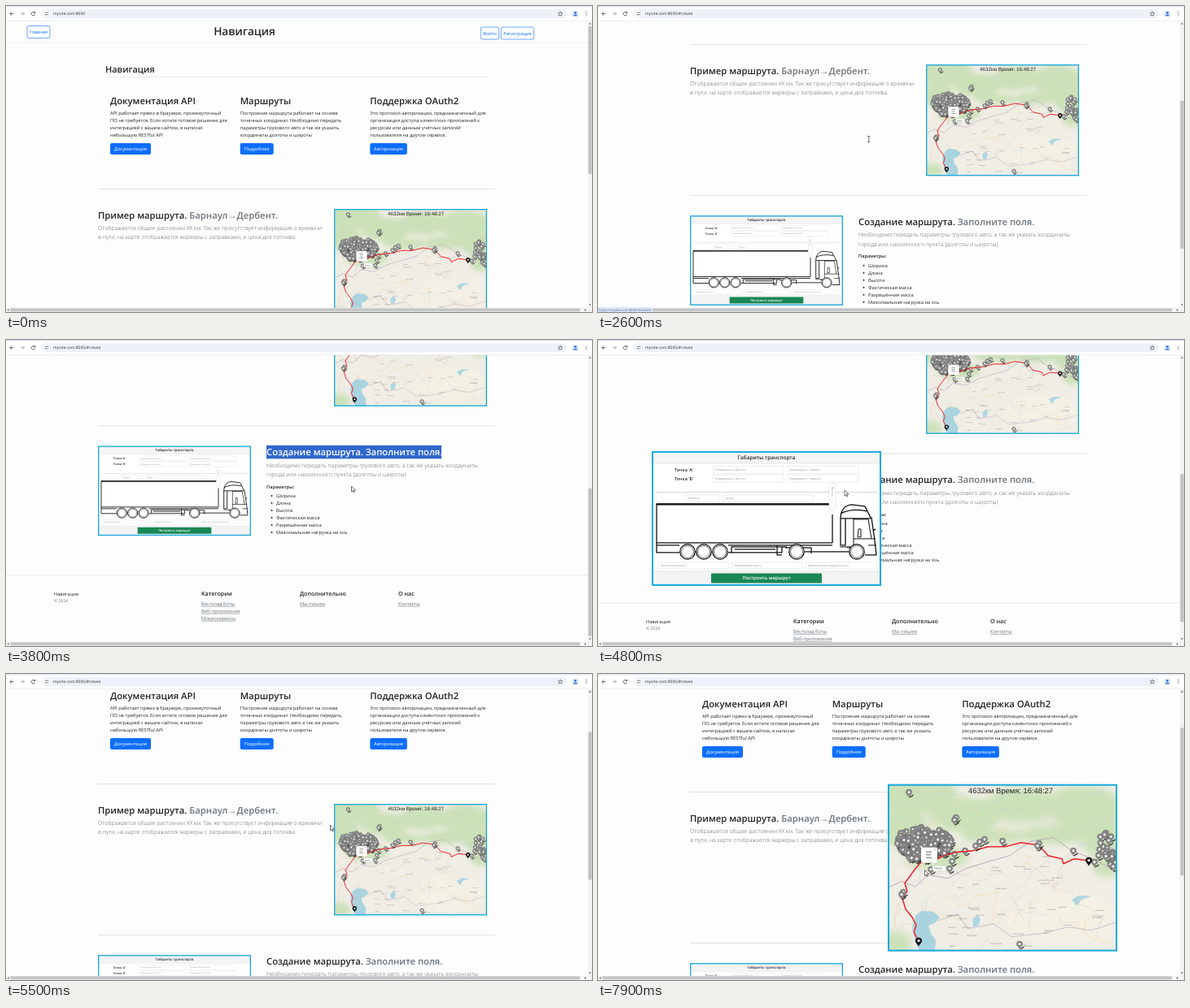
Recreate the animation shown at these times as an HTML page. Size 720 by 377 pixels, loop 8 s.

```html
<!DOCTYPE html>
<html lang="ru">
<head>
<meta charset="utf-8">
<title>Навигация</title>
<style>
html, body { margin: 0; width: 100%; height: 100%; overflow: hidden; background: #fdfdfd; }
svg { display: block; width: 100%; height: 100%; }
text { font-family: "Open Sans", "Noto Sans", sans-serif; text-rendering: geometricPrecision; white-space: pre; }
</style>
</head>
<body>
<svg id="stage" viewBox="0 0 720 377" xmlns="http://www.w3.org/2000/svg"></svg>
<script>
const INK = '#212529', MUTED = '#6c757d', BLUE = '#0d6efd', CYAN = '#18a9dd';

// y is the middle of the capitals
const text = (x, y, str, size = 5.75, extra = '') =>
  `<text x="${x}" y="${(y + size * .35).toFixed(2)}" font-size="${size}" fill="${INK}" ${extra}>${str}</text>`;
const color = c => `style="fill:${c}"`;
const semi = 'font-weight="600"';
const mid = 'text-anchor="middle"';
const lines = (x, y, step, list, size, extra) =>
  list.map((s, i) => text(x, y + i * step, s, size, extra)).join('');
const rect = (x, y, w, h, fill, extra = '') =>
  `<rect x="${x}" y="${y}" width="${w}" height="${h}" fill="${fill}" ${extra}/>`;
const rule = (x1, x2, y, c = '#d4d6d8') => rect(x1, y - .3, x2 - x1, .7, c);
const path = (d, stroke, width, extra = '') =>
  `<path d="${d}" fill="none" stroke="${stroke}" stroke-width="${width}" ${extra}/>`;
const circle = (x, y, r, fill, extra = '') => `<circle cx="${x}" cy="${y}" r="${r}" fill="${fill}" ${extra}/>`;

const button = (x, w, label, id = '') =>
  rect(x, 169, w, 14, BLUE, `rx="2" ${id}`) + text(x + w / 2, 176.2, label, 5.65, mid + color('#fff'));
const outlineButton = (x, y, w, label) =>
  rect(x, y, w, 15, '#fff', `rx="2" stroke="${BLUE}" stroke-width=".6"`) +
  text(x + w / 2, y + 7.6, label, 5.6, mid + color(BLUE));

function column(x, title, body, width, label, id) {
  return text(x, 117, title, 11.3, semi) + lines(x, 131.5, 9, body) + button(x, width, label, id);
}

function rng(seed) {
  return () => (seed = (seed * 16807) % 2147483647) / 2147483647;
}

// Route map, 282 x 206
function mapPicture() {
  const rand = rng(77);
  const span = (a, b) => a + rand() * (b - a);
  const many = (n, fn) => Array.from({ length: n }, fn).join('');
  const pin = ([x, y]) => `<use href="#pin" x="${x.toFixed(1)}" y="${y.toFixed(1)}"/>`;
  const blob = (x, y, rx, ry, fill) => `<ellipse cx="${x}" cy="${y}" rx="${rx}" ry="${ry}" fill="${fill}"/>`;

  const greens = [[30, 12, 55, 26], [95, 38, 45, 22], [20, 55, 30, 24], [165, 26, 45, 22], [240, 28, 48, 26],
    [262, 62, 26, 28], [205, 62, 40, 12], [132, 64, 42, 9], [60, 90, 40, 14], [270, 100, 18, 15], [8, 196, 22, 14]]
    .map(g => blob(...g, '#c5dfb0')).join('');
  const wander = (n, c, w) => many(n, () => {
    let x = span(0, 270), y = span(8, 200), d = `M${x | 0} ${y | 0}`;
    const dx = span(-10, 10), dy = span(-7, 7);
    for (let i = 0; i < 6; i++) d += `l${(dx + span(-5, 5)).toFixed(1)} ${(dy + span(-5, 5)).toFixed(1)}`;
    return path(d, c, w);
  });
  const towns = ['Уральск', 'Актобе', 'Костанай', 'Астана', 'Караганда', 'Атырау', 'Кокшетау', 'Аральск',
    'Ташкент', 'Бишкек', 'Павлодар', 'Балхаш', 'Жезказган', 'Тараз', 'Орск', 'Рудный'];
  const labels = many(40, (_, i) => text(span(70, 255).toFixed(1), span(88, 200), towns[i % 16], 2.7, color('#8a8a8a')));
  const cluster = Array.from({ length: 135 }, () => {
    const a = span(0, 6.283), r = Math.sqrt(rand());
    return [44 + 37 * r * Math.cos(a), 76 + 20 * r * Math.sin(a) + 3];
  });
  const east = Array.from({ length: 20 }, () => [span(258, 277), span(64, 108)]);
  const single = [[26, 16], [84, 47], [82, 50], [113, 77], [119, 74], [141, 76], [186, 79], [184, 82], [17, 142],
    [19, 139], [162, 203], [82, 92], [95, 88], [76, 110], [79, 101], [53, 111], [108, 82], [254, 102], [228, 88]];
  const pins = [...cluster, ...east, ...single].sort((a, b) => a[1] - b[1]).map(pin).join('');
  const route = 'M38 194L32 182 35 174 30 164 22 154 18 141 24 132 21 122 34 104 41 96 54 96 69 88 84 84 104 82 ' +
    '124 77 144 77 164 72 184 75 191 81 197 88 214 92 216 98 229 92 247 94';
  const target = (x, y) =>
    `<path d="M${x} ${y}c-1-3-4-4.500-4-7a4 4 0 0 1 8 0c0 2.500-3 4-4 7z" fill="#111"/>` + circle(x, y - 7, 1.6, '#fff');

  return `<g clip-path="url(#mapClip)">` + rect(0, 0, 282, 206, '#f0ede5') +
    `<g filter="url(#soft)" opacity=".85">${greens}${blob(215, 165, 70, 34, '#f4f0e4')}</g>` +
    wander(30, '#dcd6cd', .6) + wander(18, '#f3d9a4', .6) + wander(16, '#b9d5e0', .5) +
    path('M0 128L16 120 34 126 50 112 74 116 96 104 122 96 150 88 176 70 204 66 226 82 252 92 282 108', '#b9a3bd', .9) +
    path('M62 168L86 160 98 178 130 172 152 188 190 184 222 176 250 180 282 170', '#c3b0c6', .8) +
    '<path d="M30 176L34 162 42 156 56 157 64 164 58 171 50 174 53 184 59 192 58 206H40L34 196z" fill="#a9d3df"/>' +
    '<path d="M104 166l6-5 4 5-3 9-6 1zM226 142l10-5 14 1-12 4-6 8z" fill="#aed6e0"/>' +
    labels + `<ellipse cx="45" cy="77" rx="34" ry="17" fill="#777"/>` +
    path(route, '#f0242b', 1.5, 'stroke-linejoin="round"') + pins +
    path('M41 96L54 96 69 88 84 84 104 82', '#f0242b', 1.2) + target(38, 200) + target(247, 101) +
    rect(41, 78, 20, 19, '#fff', 'rx="2.500"') +
    [83, 86.5, 90].map((y, i) => rect(47, y, 7 - i % 2, 1.1, '#777')).join('') + rect(57, 80, 1.5, 1.2, '#aaa') +
    rect(55, 101, 16, 5, '#fff', 'rx=".8"') + text(57, 103.500, 'маркер', 2.6) +
    `<text x="151" y="11.600" font-size="9.4" fill="#222" ${mid} style="font-family:'Liberation Sans',sans-serif">4632км Время: 16:48:27</text>` +
    '</g>' + rect(1, 1, 280, 204, 'none', `stroke="${CYAN}" stroke-width="2"`);
}

// Vehicle form, 282 x 166
function truckPicture() {
  const field = (x, y, w, hint, h = 9) =>
    rect(x, y, w, h, '#fff', 'stroke="#d5d8dc" stroke-width=".5" rx=".8"') +
    text(x + 3, y + h / 2, hint, 3.3, color('#858b91'));
  const row = y => field(75, y, 87, 'Координаты X: Долгота') + field(167, y, 87, 'Координаты Y: Широта');
  const wheel = x => circle(x, 124, 9.2, '#fff', 'stroke="#111" stroke-width="1.300"') +
    circle(x, 124, 7.4, 'none', 'stroke="#111" stroke-width=".6"');
  const black = (d, w = 1.3) => path(d, '#111', w, 'stroke-linejoin="round"');
  return rect(0, 0, 282, 166, '#fff') + rect(0, 0, 282, 15, '#f4f4f4') + rule(0, 282, 15, '#dedede') +
    text(141, 8.3, 'Габариты транспорта', 6.45, mid + ' ' + semi) +
    text(28, 23, "Точка 'А'", 5.5, semi) + text(28, 34, "Точка 'Б'", 5.5, semi) + row(18.5) + row(29.3) +
    rule(5, 277, 50.5, '#c4c7ca') + field(42, 54, 41, 'Ширина', 8) + field(88, 54, 111, 'Длина', 8) +
    black('M222 65H6V113H222') + black('M6 65.500H218', 2) + black('M222 78V113M6 113V125H34M94 125H98M6 116H34M94 116H222') +
    rect(218, 40, 8, 33, '#fff', 'stroke="#d5d8dc" stroke-width=".5"') +
    `<g transform="translate(222 44) rotate(90)">${text(0, 0, 'Высота', 3.3, color('#858b91'))}</g>` +
    black('M98 118H160V125H98zM102 121H152M154 116V128H160') + black('M160 118H166M188 124H242M164 119H196M196 119V126') +
    black('M232 116V82Q233 67 246 66L262 68 269 82 270 82 274 110 276 128H262M232 83H269M238 83V116H232') +
    black('M248 83V124M248 84H266L270 108H248M254 96H257V106H253zM240 119H248M270 108H275M266 116H276M231 118H245', 1) +
    black('M232 77Q246 70 264 74M272 98L275 96') + [44, 64, 84, 178, 252].map(wheel).join('') +
    field(8, 137, 86, 'Фактическая масса', 8) + field(99, 137, 86, 'Разрешённая масса', 8) +
    field(189, 137, 86, 'Максимальная нагрузка на ось', 8) +
    rect(0, 148, 282, 18, '#f3f3f3') + rule(0, 282, 148, '#dedede') + rect(73, 150.5, 136, 12, '#198754', 'rx="1"') +
    text(141, 156.500, 'Построить маршрут', 5.8, mid + ' ' + semi + color('#fff')) +
    rect(1, 1, 280, 164, 'none', `stroke="${CYAN}" stroke-width="2"`);
}

const feature = (x, y, title, tail) =>
  `<text x="${x}" y="${y + 4}" font-size="11.25" ${semi} fill="${INK}">${title} <tspan fill="${MUTED}">${tail}</tspan></text>`;
const lead = 'font-weight="300" ' + color('#5c6168');

function pageContent() {
  const link = 'text-decoration="underline" ' + color(MUTED);
  const params = ['Ширина', 'Длина', 'Высота', 'Фактическая масса', 'Разрешённая масса', 'Максимальная нагрузка на ось'];
  return outlineButton(26, 24.5, 28, 'Главная') + text(293, 31.500, 'Навигация', 13.65, mid + ' ' + semi) +
    outlineButton(583.3, 26, 22.4, 'Войти') + outlineButton(608.3, 26, 40.4, 'Регистрация') + rule(0, 715, 45, '#e6e7e8') +
    text(122, 78, 'Навигация', 10.95, semi) + rule(122, 591, 87.5, '#dee2e6') +
    column(128, 'Документация API', ['API работает прямо в браузере, промежуточный', 'ПО не требуется. Если хотите готовое решение для',
      'интеграцией с вашим сайтом, я написал', 'небольшую RESTful API'], 50, 'Документация') +
    column(287.7, 'Маршруты', ['Построение маршрута работает на основе', 'точечных координат. Необходимо передать',
      'параметры грузового авто а так же указать', 'координаты долготы и широты'], 41, 'Подробнее', 'id="more"') +
    column(447.3, 'Поддержка OAuth2', ['Это протокол авторизации, предназначенный для', 'организации доступа клиентских приложений к',
      'ресурсам или данным учётных записей', 'пользователя на другом сервисе.'], 45.5, 'Авторизация') +
    rule(113, 601, 225.3) + feature(113, 258, 'Пример маршрута.', 'Барнаул→Дербент.') +
    lines(113, 273.5, 11.3, ['Отображается общее растоянии XX км. Так же присутствует информация о времени',
      'в пути, на карте отображается маркеры с заправками, и цена диз топлива.'], 7, lead) +
    rule(113, 601, 411.500) + feature(320, 444, 'Создание маршрута.', 'Заполните поля.') +
    `<g id="selection">${rect(320, 435.5, 215, 16.5, '#2f67cd')}` +
    `${text(320, 444.06, 'Создание маршрута. Заполните поля.', 11.25, semi + color('#fff'))}</g>` +
    lines(320, 460, 11.3, ['Необходимо передать параметры грузового авто, а так же указать координаты',
      'города или населенного пункта (долготы и широты)'], 7, lead) +
    text(320, 486.500, 'Параметры:', 5.65, semi) + lines(332, 497.5, 9, params) +
    params.map((_, i) => circle(326.500, 497.8 + i * 9, 1, INK)).join('') +
    rule(0, 715, 595.5, '#dee2e6') + text(59, 618.500, 'Навигация', 5.65) + text(59, 627.3, '© 2024', 5.1, color(MUTED)) +
    text(240, 618.5, 'Категории', 7.1, semi) + lines(240, 630.5, 9, ['Вестолад боты', 'Веб-приложения', 'Микросервисы'], 5.75, link) +
    text(361, 618.5, 'Дополнительно', 7.05, semi) + text(361, 630.5, 'Мы пишем', 5.75, link) +
    text(482, 618.5, 'О нас', 7.1, semi) + text(482, 630.500, 'Контакты', 5.75, link) +
    `<g id="truck">${truckPicture()}</g><g id="map">${mapPicture()}</g>`;
}

function browserFrame() {
  const icon = (d, c = '#444') => path(d, c, .8);
  return rect(0, 0, 720, 18.3, '#fff') + rect(0, 0, 720, 1.2, '#dbe5f6') + rule(0, 720, 18.2, '#e3e6ea') +
    rect(44, 4, 645, 11, '#edf1f9', 'rx="5.500"') +
    icon('M9.500 9.500H5M7 7.300L4.800 9.500 7 11.700') + icon('M18 9.500H22.500M20.500 7.300L22.700 9.500 20.500 11.700', '#999') +
    icon('M35.500 8.200A2.300 2.300 0 1 0 35.800 10.300M35.900 6.800V8.600H34') + circle(50, 9.5, 3.8, '#fff') +
    icon('M48 8.300H50M48 10.800H49M51 10.800H52.200') + circle(51.3, 8.3, .7, '#444') + circle(49.7, 10.8, .7, '#444') +
    `<text id="url" x="58" y="11.300" font-size="4.95" fill="#333"></text>` +
    path('M681 6.700l.8 1.800 2 .2-1.500 1.300.4 2-1.700-1-1.700 1 .4-2-1.500-1.300 2-.2z', '#444', .6) +
    circle(699.5, 9.5, 4, '#d6e5fb') + circle(699.5, 8.3, 1.4, '#2f6fd0') +
    '<path d="M696.800 12.200a2.800 2.300 0 0 1 5.400 0z" fill="#2f6fd0"/>' +
    [7, 9.4, 11.8].map(y => circle(713, y, .6, '#444')).join('') +
    rect(715, 18.5, 5, 354, '#f3f3f3') + rect(715.4, 0, 4.2, 182, '#bfc0c1', 'id="thumb"') +
    rect(0, 371.8, 720, 5.2, '#f3f3f3') + rect(5.5, 372.4, 699.5, 4, '#c4c5c6') +
    '<path d="M716 22.500l1.500-2 1.500 2zM716 367.500l1.500 2 1.500-2zM3.500 373l-2 1.500 2 1.500zM711 373l2 1.500-2 1.500z" fill="#666"/>' +
    `<g id="status">${rect(0, 371, 67, 6, '#dde8f8')}${text(1, 374.1, 'https://mysite.com:8000/#create', 4.2, color('#4d6590'))}</g>`;
}

const cursors =
  '<path id="arrow" d="M0 0V7l1.600-1.500 1.100 2.400 1.100-.5-1.100-2.300H5z" fill="#fff" stroke="#111" stroke-width=".6"/>' +
  '<path id="hand" d="M-.8 4V.6a.8.8 0 0 1 1.600 0V3l3 .7q.8.300.6 1.300L3.800 8H0L-2.500 5q0-1.500 1.700-.3z" fill="#fff" stroke="#111" stroke-width=".6"/>' +
  '<path id="beam" d="M-1.500-3.500H1.500M0-3.500V3.500M-1.500 3.500H1.500" fill="none" stroke="#333" stroke-width=".7"/>';

const stage = document.getElementById('stage');
stage.innerHTML = `<defs><clipPath id="mapClip"><rect width="282" height="206"/></clipPath>
  <filter id="soft"><feGaussianBlur stdDeviation="5"/></filter>
  <g id="pin"><path d="M0 0L6-3.500 5-1.500 1 .8z" fill="#222"/>
  <path d="M0 0C-1-2.500-3.800-3.500-3.800-6a3.800 3.800 0 0 1 7.600 0C3.800-3.500 1-2.500 0 0z" fill="#858585" stroke="#666" stroke-width=".3"/>
  <circle cy="-6" r="1.600" fill="#f2f2f2"/></g></defs>
  <g id="page">${pageContent()}</g>${browserFrame()}<g id="cursor">${cursors}</g>`;

const el = Object.fromEntries([...stage.querySelectorAll('[id]')].map(e => [e.id, e]));

const scrollKeys = [[2300, 0], [2400, 8], [2500, 78], [2600, 178], [2700, 245], [2800, 282], [2900, 300], [3000, 305.7],
  [4600, 305.7], [4700, 290], [4800, 271.6], [4900, 250], [5000, 232], [5300, 148], [5400, 112], [5500, 90], [5700, 80]];
const truckKeys = [[4200, 1], [4500, 1.5], [4800, 1.5], [5000, 1]];
const mapKeys = [[5900, 1], [6200, 1.5]];
const pointerKeys = [[400, 651, 114], [500, 530, 118], [600, 380, 123], [700, 251, 127], [800, 251, 127], [1700, 303, 173],
  [1800, 304, 176], [2300, 304, 176], [2800, 352, 156], [3100, 350, 146], [3300, 345, 139], [3500, 345, 139],
  [3800, 424.5, 180], [4100, 350, 205], [4300, 282, 214], [4500, 290, 200], [4800, 303, 185], [5000, 354, 180],
  [5500, 398.5, 186], [5900, 399, 187], [6200, 450, 205], [6800, 560, 165], [7000, 593, 150], [7300, 570, 212],
  [7700, 412, 226], [7800, 407, 233], [7900, 401.5, 241.5]];

function at(keys, t) {
  const i = keys.findIndex(k => k[0] > t);
  if (i === 0) return keys[0].slice(1);
  if (i < 0) return keys[keys.length - 1].slice(1);
  const a = keys[i - 1], b = keys[i], p = (t - a[0]) / (b[0] - a[0]);
  return a.slice(1).map((v, j) => v + (b[j + 1] - v) * p);
}

const show = (node, on) => node.setAttribute('visibility', on ? 'visible' : 'hidden');
const move = (node, value) => node.setAttribute('transform', value);
const zoom = (node, x, y, h, s) =>
  move(node, `translate(${x} ${y}) scale(${s / 1.5}) translate(-141 ${-h / 2})`);

function draw(t) {
  const [scroll] = at(scrollKeys, t);
  move(el.page, `translate(0 ${-scroll})`);
  el.thumb.setAttribute('y', 25 + scroll * .516);
  el.url.textContent = 'mysite.com:8000' + (t >= 2400 ? '/#create' : '');
  el.more.setAttribute('fill', t >= 1800 && t < 2400 ? '#0b5ed7' : BLUE);
  show(el.selection, t >= 3500 && t < 4100);
  show(el.status, t >= 2000 && t < 3000);
  zoom(el.truck, 207, 491.5, 166, at(truckKeys, t)[0]);
  zoom(el.map, 497, 318.7, 206, at(mapKeys, t)[0]);

  const shape = t >= 1700 && t < 2400 ? 'hand' : t >= 2400 && t < 3700 ? 'beam' : 'arrow';
  for (const id of ['arrow', 'hand', 'beam']) show(el[id], t >= 400 && id === shape);
  move(el.cursor, `translate(${at(pointerKeys, t).join(' ')})`);
}

function tick() {
  draw(Math.floor(performance.now() % 8000 / 100) * 100);
  requestAnimationFrame(tick);
}
tick();
</script>
</body>
</html>
```
